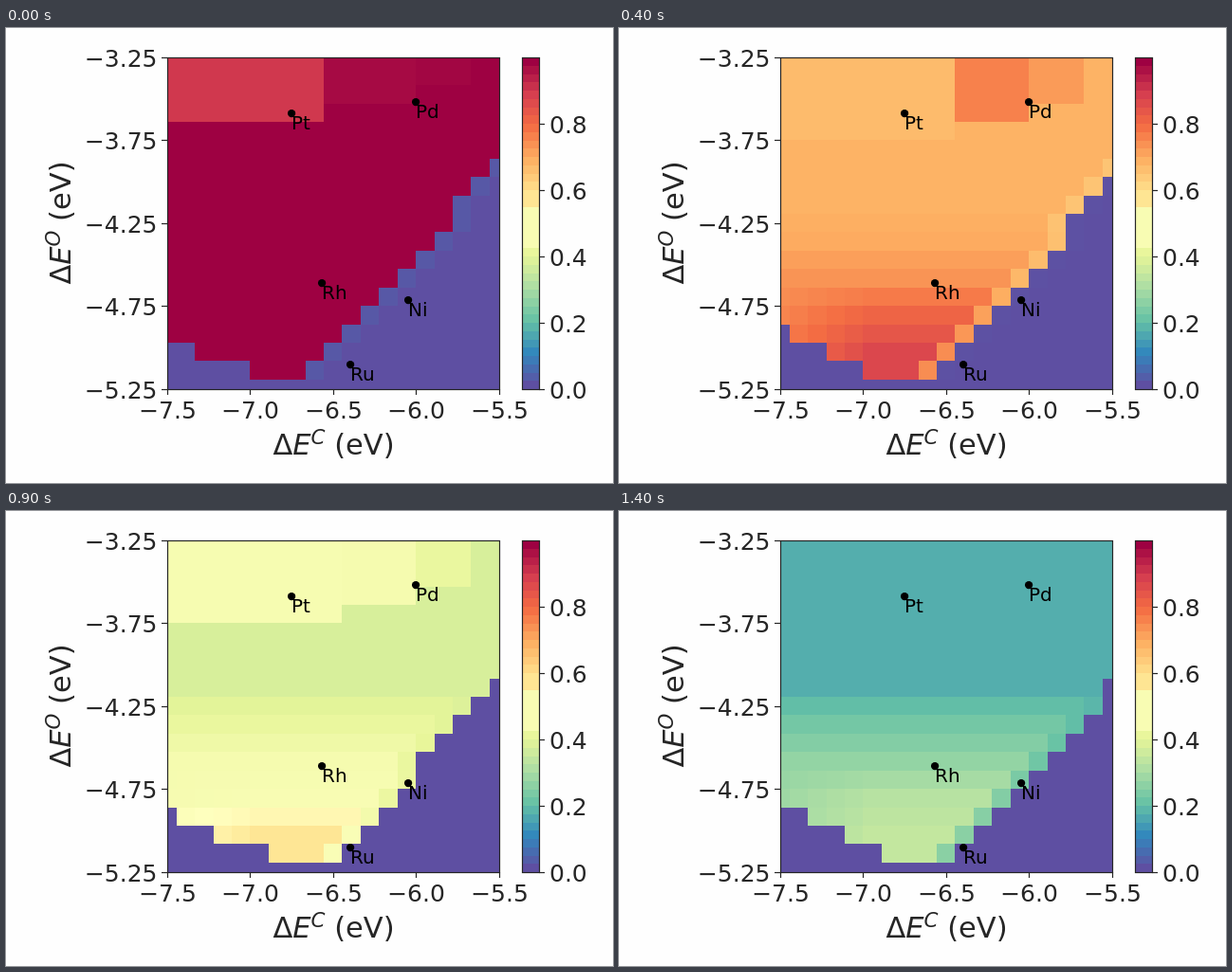
Recreate the animation shown at these times as an HTML page with a canvas. Size 640 px wide and 480 px high, loop 1.5 s.

```html
<!DOCTYPE html>
<html lang="en">
<head>
<meta charset="utf-8">
<title>Binding energy map</title>
<style>
html, body { margin: 0; width: 100%; height: 100%; overflow: hidden; background: #fefefe; }
canvas { display: block; }
</style>
</head>
<body>
<canvas id="stage" width="640" height="480"></canvas>
<script>
const ctx = document.getElementById('stage').getContext('2d');
const N = 19, STEP = 100, STEPS = 15;
const LEFT = 170, TOP = 31, SIZE = 349.5, BOTTOM = 381, INK = '#262626';
const FONT = '"DejaVu Sans", sans-serif';
const SPECTRAL = ['5e4fa2', '3288bd', '66c2a5', 'abdda4', 'e6f598', 'ffffbf',
  'fee08b', 'fdae61', 'f46d43', 'd53e4f', '9e0142']
  .map(hex => [0, 2, 4].map(i => parseInt(hex.slice(i, i + 2), 16)));

// Each curve gives its value at the key steps; levels are percentages.
const KEY_STEPS = [0, 2, 4, 7, 9, 11, 14];
const curves = {
  topLeft: [91, 76, 67.5, 55.5, 46.5, 32.5, 18],
  topRight: [98.5, 93, 77, 57, 46, 33, 17],
  topDepth: [4, 5, 5, 5.4, 5, 3, 0],
  front: [0.37, 1.15, 1.3, 1.94, 2.08, 2.3, 2.37],
  corner: [0.2, 0.6, 1, 1.1, 1.2, 2, 2]
};
const PROFILE_ROWS = [8, 10, 12, 14, 16];
const profiles = [
  [100, 89, 69, 51.2, 37.5, 25, 16.5],
  [100, 89, 70.5, 51.2, 41.5, 28.5, 22],
  [100, 91, 74, 56, 46, 36, 26.5],
  [100, 94, 82, 65, 47, 42, 32],
  [100, 99.5, 88, 70, 58, 46, 34]
];

const mix = (a, b, k) => a + (b - a) * k;
const clamp = k => Math.min(1, Math.max(0, k));

function sample(xs, ys, x) {
  const i = Math.min(xs.length - 1, Math.max(1, xs.findIndex(key => key >= x)));
  return mix(ys[i - 1], ys[i], clamp((x - xs[i - 1]) / (xs[i] - xs[i - 1])));
}

// Returns a function that gives the level of a cell at the given step.
function makeField(step) {
  const now = curve => sample(KEY_STEPS, curve, step);
  const [topLeft, topRight, topDepth, front, corner] = Object.values(curves).map(now);
  const profile = profiles.map(now);
  const mid = profile[0], low = profile[2];
  const shore = 9 + Math.min(1, step / 2);
  const depth = Math.round(topDepth);
  const rimDrop = 8 * Math.min(1, step / 2) * Math.max(0, 1 - step / 7);

  function surface(row, col) {
    if (col < shore && row < depth) return topLeft;
    if (col >= shore && col < 14 && row < depth - 1) return topRight;
    if (col >= 14 && col < 17 && row < depth - 2) return mix(topRight, mid, 0.5);
    const level = row <= 8 ? mid : sample(PROFILE_ROWS, profile, Math.min(16, row));
    return row < 13 ? level : mix(low, level, clamp((col + 2) / 7));
  }

  return (row, col) => {
    const rightEdge = Math.floor(24 + front + row / 14) - row;
    const leftEdge = Math.floor(2.4 * (row - 15) + corner);
    if (row === N - 1 || col < leftEdge || col > rightEdge) return 0;
    if (col === rightEdge) return 1.5 * Math.max(0, 1 - step / 5);
    const level = surface(row, col);
    return col === rightEdge - 1 ? mix(level, mid, 0.5) - rimDrop : level;
  };
}

function color(level) {
  const pos = Math.min(9.999, Math.max(0, level / 10)), i = Math.floor(pos);
  const rgb = SPECTRAL[i].map((c, k) => Math.round(mix(c, SPECTRAL[i + 1][k], pos - i)));
  return `rgb(${rgb})`;
}

const cellEdge = (origin, i) =>
  Math.round(origin + Math.min(SIZE, Math.max(0, (i - 0.5) * SIZE / (N - 1))));

function drawMap(step) {
  const field = makeField(step);
  for (let row = 0; row < N; row++) {
    const y = cellEdge(TOP, row), h = cellEdge(TOP, row + 1) - y;
    for (let col = 0; col < N; col++) {
      const x = cellEdge(LEFT, col);
      ctx.fillStyle = color(field(row, col));
      ctx.fillRect(x, y, cellEdge(LEFT, col + 1) - x, h);
    }
  }
}

function text(str, x, y, size, align = 'left', fill = INK, style = '') {
  ctx.font = `${style} ${size}px ${FONT}`;
  ctx.textAlign = align;
  ctx.fillStyle = fill;
  ctx.fillText(str, x, y);
}

function line(x1, y1, x2, y2) {
  ctx.beginPath();
  ctx.moveTo(x1, y1);
  ctx.lineTo(x2, y2);
  ctx.stroke();
}

function drawColorbar() {
  const bands = 40, edge = i => Math.round(BOTTOM - i * 350 / bands);
  for (let i = 0; i < bands; i++) {
    let level = i * 100 / (bands - 1);
    if (level > 42 && level < 55) level = 47;
    else if (level > 55 && level < 60) level = 58.5;
    ctx.fillStyle = color(level);
    ctx.fillRect(544, edge(i + 1), 18, edge(i) - edge(i + 1));
  }
}

function drawAxisLabel(sup, x, y, angle) {
  const parts = [['Δ', 30.5, 0, ''], ['E', 30.5, 0, 'italic'],
    [sup, 21.4, -11.5, 'italic'], [' (eV)', 30.5, 0, '']];
  const widths = parts.map(([str, size, , style]) => {
    ctx.font = `${style} ${size}px ${FONT}`;
    return ctx.measureText(str).width;
  });
  ctx.save();
  ctx.translate(x, y);
  ctx.rotate(angle);
  let pen = -widths.reduce((sum, w) => sum + w, 0) / 2;
  parts.forEach(([str, size, dy, style], i) => {
    text(str, pen, dy, size, 'left', INK, style);
    pen += widths[i];
  });
  ctx.restore();
}

function drawAxes() {
  ctx.strokeStyle = INK;
  ctx.lineWidth = 1.2;
  ctx.strokeRect(LEFT + 0.5, TOP + 0.5, 350, 350);
  ctx.strokeRect(544.5, TOP + 0.5, 18, 350);
  for (let i = 0; i < 5; i++) {
    const d = i * SIZE / 4;
    const x = Math.floor(LEFT + 0.5 + d) + 0.5, y = Math.floor(TOP + 0.5 + d) + 0.5;
    line(x, BOTTOM, x, 387);
    line(164, y, LEFT, y);
    text('−' + (7.5 - i / 2).toFixed(1), x, 412, 25, 'center');
    text('−' + (3.25 + i / 2).toFixed(2), 159.5, Math.round(y + 9), 25, 'right');
    const tick = BOTTOM + 0.5 - i * 70;
    line(562, tick, 568, tick);
    text((i / 5).toFixed(1), 573, Math.round(tick + 9), 25);
  }
  drawAxisLabel('C', 345.5, 450, 0);
  drawAxisLabel('O', 68, 205.5, -Math.PI / 2);
}

const metals = [['Pt', 301, 90], ['Pd', 432, 78], ['Rh', 333, 269], ['Ni', 424, 287], ['Ru', 363, 355]];

function drawMetals() {
  for (const [name, x, y] of metals) {
    ctx.fillStyle = '#000';
    ctx.beginPath();
    ctx.arc(x + 0.1, y + 0.1, 4.15, 0, Math.PI * 2);
    ctx.fill();
    text(name, x, y + 17, 20, 'left', '#000');
  }
}

const start = performance.now();

function render() {
  const step = Math.floor((performance.now() - start) / STEP) % STEPS;
  ctx.fillStyle = '#fefefe';
  ctx.fillRect(0, 0, 640, 480);
  drawMap(step);
  drawColorbar();
  drawAxes();
  drawMetals();
  requestAnimationFrame(render);
}
render();
</script>
</body>
</html>
```
